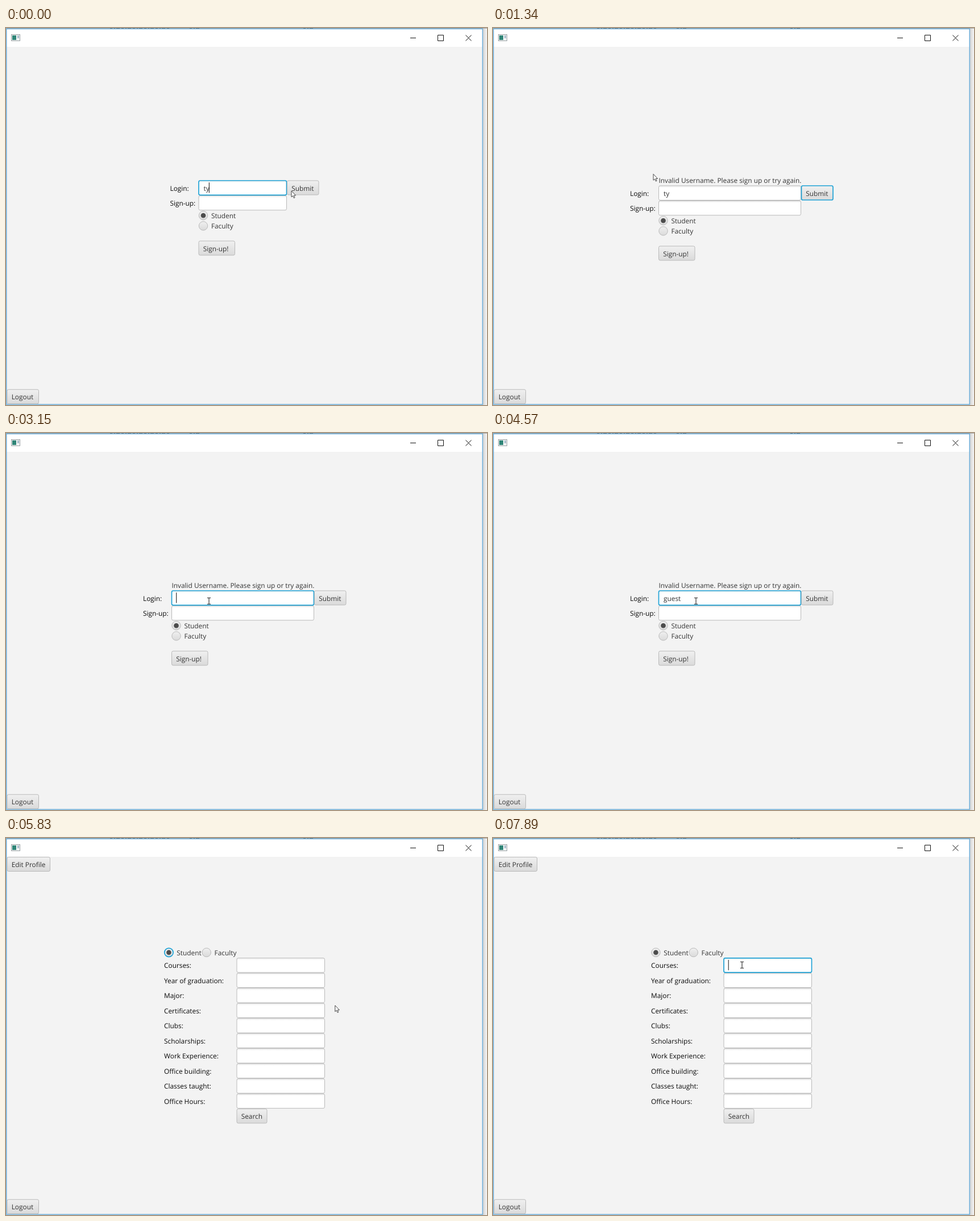
These frames come from a looping animation (846x662 px, 8 s). An HTML page:

```html
<!DOCTYPE html>
<html lang="en">
<head>
<meta charset="utf-8">
<title>Login and search form</title>
<style>
  html, body { margin: 0; width: 100%; height: 100%; overflow: hidden; background: #f3f3f3; }
  svg { display: block; }
  text {
    font: 11.85px "Open Sans", "Noto Sans", sans-serif;
    fill: #333;
    text-rendering: geometricPrecision;
    white-space: pre;
  }
  text.label { fill: #0a0a0a; }
  .edge { fill: none; stroke: #b9b9b9; }
  .focus { fill: none; stroke: #20a3d6; stroke-width: 1.7; }
  .caret { stroke: #222; stroke-width: 1.1; }
  .chrome { fill: none; stroke: #111; }
</style>
</head>
<body>
<svg width="846" height="662" viewBox="0 0 846 662">
  <defs>
    <linearGradient id="normal" x2="0" y2="1">
      <stop stop-color="#f0f0f0"/><stop offset="1" stop-color="#dadada"/>
    </linearGradient>
    <linearGradient id="pressed" x2="0" y2="1">
      <stop stop-color="#d9d9d9"/><stop offset="1" stop-color="#c6c6c6"/>
    </linearGradient>
    <linearGradient id="inset" x2="0" y2="1">
      <stop stop-color="#ededed"/><stop offset=".16" stop-color="#fff"/>
    </linearGradient>
    <linearGradient id="shade">
      <stop stop-color="#d2d2d2"/><stop offset="1" stop-color="#f6f6f6"/>
    </linearGradient>
  </defs>

  <!-- window -->
  <rect width="846" height="662" fill="#f3f3f3"/>
  <rect x="839" width="7" height="662" fill="url(#shade)"/>
  <rect x="1" y="2" width="837" height="31" fill="#fff"/>
  <rect width="846" height="1" fill="#a6a6a6"/>
  <path d="M183 .8H290M323 .8H342M523 .8H543" stroke="#666" stroke-width="1.6" stroke-dasharray="4 3 2 2 6 3"/>
  <rect x=".75" y="1.5" width="837.5" height="659.5" fill="none" stroke="#66abd9" stroke-width="1.4"/>
  <rect x="9.5" y="11.5" width="15" height="11" fill="#f4f6f6" stroke="#98a0a2"/>
  <rect x="11" y="13" width="7" height="8" fill="#2f8577"/>
  <rect x="20" y="13" width="3" height="5" fill="#a8bccb"/>
  <path class="chrome" d="M711 17.5H721M759.5 12.5H769.5V22.5H759.5ZM808.5 12.5L818.5 22.5M818.5 12.5L808.5 22.5"/>

  <g id="scene"></g>
  <g id="pointer"></g>
</svg>
<script>
const LOOP = 8000;
const scene = document.getElementById('scene');
const pointer = document.getElementById('pointer');

const SHAPES = {
  arrow: '<path d="M0 0V10.8L2.5 8.6L4.3 12.6L6 11.8L4.3 8H7.6Z" fill="#fff" stroke="#333" stroke-width=".9"/>',
  beam: '<path d="M-3 -5.5H-.8L0 -5L.8 -5.5H3M0 -5V5M-3 5.5H-.8L0 5L.8 5.5H3" fill="none" stroke="#222" stroke-width="1.1"/>'
};

const text = (x, y, s, cls = '') => `<text x="${x}" y="${y}" class="${cls}">${s}</text>`;

const box = (x, y, w, h, fill, focused) =>
  `<rect x="${x + .5}" y="${y + .5}" width="${w - 1}" height="${h - 1}" rx="2.5" fill="url(#${fill})" class=""/>` +
  `<rect x="${x + .5}" y="${y + .5}" width="${w - 1}" height="${h - 1}" rx="2.5" class="${focused ? 'focus' : 'edge'}"/>`;

const button = (x, y, w, s, focused, pressed) =>
  box(x, y, w, 26, pressed ? 'pressed' : 'normal', focused) + text(x + 8.2, y + 18, s);

const field = (x, y, w, focused, s = '') =>
  box(x, y, w, 26.3, 'inset', focused) + text(x + 9, y + 18, s, 'value');

const radio = (x, y, s, on, focused) =>
  `<circle cx="${x}" cy="${y}" r="7.7" fill="url(#normal)"/>` +
  `<circle cx="${x}" cy="${y}" r="7.7" class="${focused ? 'focus' : 'edge'}"/>` +
  (on ? `<circle cx="${x}" cy="${y}" r="4.3" fill="#4c4c4c"/>` : '') +
  text(x + 13.9, y + 4.7, s);

function loginForm({ wide, focus, pressed, value }) {
  const [x, y, w] = wide ? [291, 276.5, 251] : [338.5, 267.5, 155.5];
  return (wide ? text(x + .5, y - 4.5, 'Invalid Username. Please sign up or try again.') : '') +
    text(x - 50, y + 18, 'Login:', 'label') +
    text(x - 50, y + 44.5, 'Sign-up:', 'label') +
    field(x, y + 26.5, w) +
    field(x, y, w, focus === 'field', value) +
    button(x + w, y, 56.5, 'Submit', focus === 'submit', pressed) +
    radio(x + 8.5, y + 61.7, 'Student', true) +
    radio(x + 8.5, y + 80, 'Faculty') +
    button(x, y + 106, 64.5, 'Sign-up!');
}

const CRITERIA = ['Courses', 'Year of graduation', 'Major', 'Certificates', 'Clubs',
  'Scholarships', 'Work Experience', 'Office building', 'Classes taught', 'Office Hours'];

function searchForm({ focus }) {
  const rows = CRITERIA.map((name, i) => {
    const y = 210.3 + 26.5 * i;
    return text(278, y + 18, name + ':', 'label') + field(405.5, y, 155.5);
  });
  return button(1.5, 33, 76.5, 'Edit Profile') +
    radio(286.4, 201, 'Student', true, focus === 'radio') +
    radio(352.7, 201, 'Faculty') +
    rows.join('') +
    (focus === 'field' ? field(405.5, 210.3, 155.5, true) : '') +
    button(405.5, 475.3, 54, 'Search');
}

// Changes to the form, each carried on to the next
const form = [
  [0, { search: false, wide: false, focus: 'field', pressed: false, value: 'ty', caret: true }],
  [150, { focus: 'submit', pressed: true, caret: false }],
  [350, { wide: true, pressed: false }],
  [2160, { focus: 'field', caret: true }],
  [2720, { caret: false }],
  [3000, { value: 't', caret: true }],
  [3150, { value: '' }],
  [3430, { value: 'g' }],
  [3710, { value: 'gue' }],
  [3850, { value: 'gues' }],
  [3990, { value: 'guest' }],
  [4570, { caret: false }],
  [5130, { caret: true }],
  [5550, { focus: 'submit', pressed: true, caret: false }],
  [5830, { search: true, focus: 'radio', pressed: false, value: '' }],
  [7080, { focus: 'field', caret: true }],
  [7640, { caret: false }],
  [7890, { caret: true }]
];

const path = [
  [0, 502, 286, 'arrow'], [150, 529, 291, 'arrow'],
  [920, 500, 288, 'beam'], [1060, 425, 273, 'arrow'], [1200, 330, 259, 'arrow'],
  [1340, 282, 256.5, 'arrow'], [1470, 275.5, 260, 'arrow'], [1610, 284, 275, 'arrow'],
  [1750, 322, 291, 'beam'], [1890, 350, 295, 'beam'], [2020, 357, 295, 'beam'],
  [4980, 372, 296, 'beam'], [5130, 440, 298, 'beam'], [5270, 525, 297, 'beam'],
  [5410, 573, 296, 'arrow'], [5550, 580, 294, 'arrow'], [5830, 578.8, 294, 'arrow'],
  [5950, 573, 288, 'arrow'], [6090, 552, 272, 'beam'], [6230, 520, 254, 'beam'],
  [6370, 486, 240, 'beam'], [6510, 460, 231, 'beam'], [6660, 446, 226, 'beam'],
  [6940, 438, 223, 'beam']
];

const last = (steps, t) => steps.findLastIndex(step => step[0] <= t);

function drawForm(index) {
  const state = Object.assign({}, ...form.slice(0, index + 1).map(step => step[1]));
  scene.innerHTML = (state.search ? searchForm(state) : loginForm(state)) +
    button(1.5, 634.3, 56.5, 'Logout');
  if (!state.caret) return;
  const values = scene.querySelectorAll('.value');
  const active = values[values.length - 1];
  const x = +active.getAttribute('x') + active.getComputedTextLength() - .3;
  const y = +active.getAttribute('y');
  scene.insertAdjacentHTML('beforeend',
    `<path class="caret" d="M${x} ${y - 14.3}V${y + 4}"/>`);
}

function drawPointer(index) {
  const [, x, y, shape] = path[index];
  pointer.setAttribute('transform', `translate(${x} ${y})`);
  pointer.innerHTML = SHAPES[shape];
}

const start = performance.now();
let shownForm = -1, shownPointer = -1;

function tick() {
  const t = (performance.now() - start) % LOOP;
  const f = last(form, t), p = last(path, t);
  if (f !== shownForm) drawForm(shownForm = f);
  if (p !== shownPointer) drawPointer(shownPointer = p);
  requestAnimationFrame(tick);
}
tick();
</script>
</body>
</html>
```
